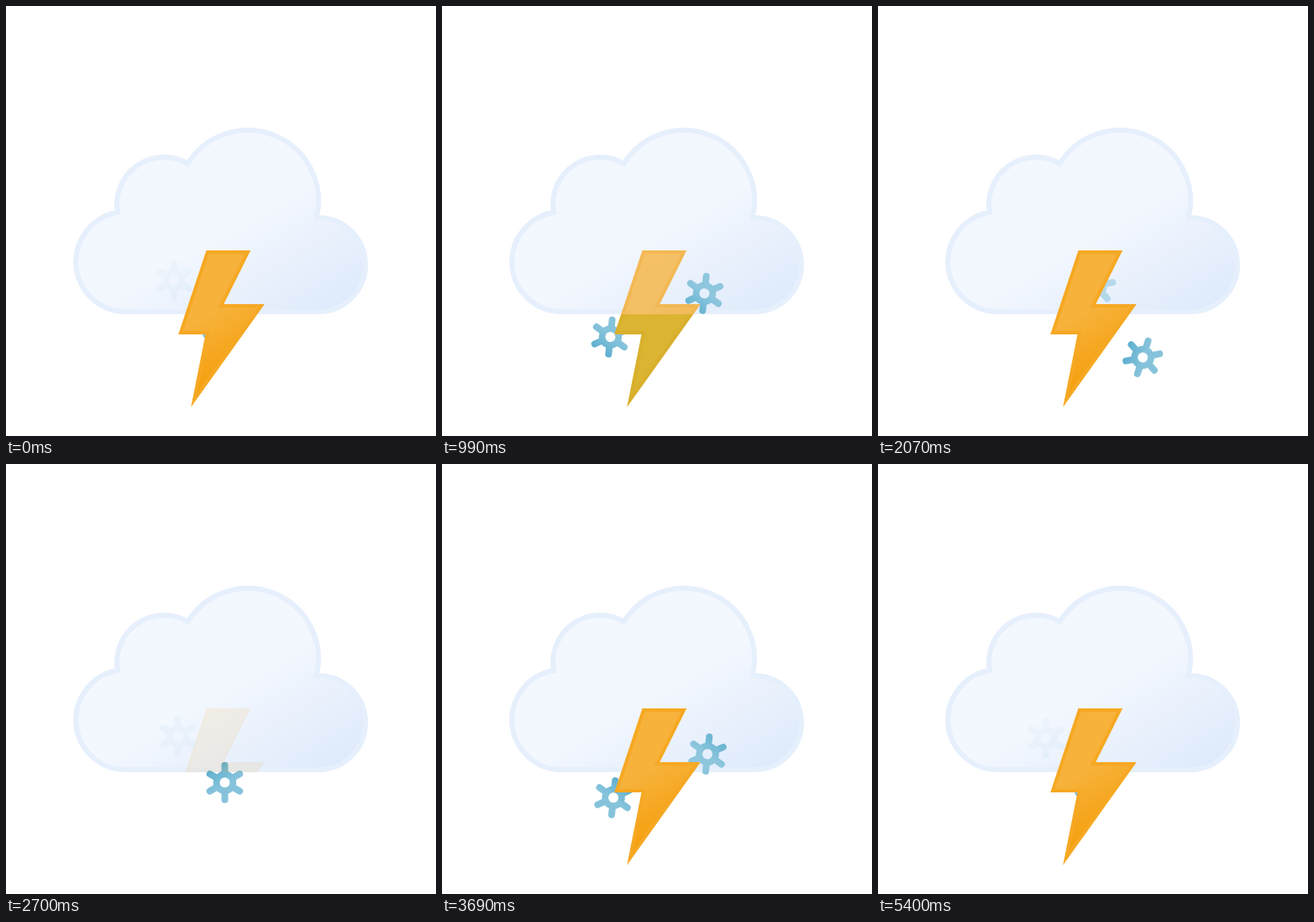
Recreate the animation shown at these times as an HTML page. Size 512 by 512 pixels, loop 5.43 s.

```html
<!DOCTYPE html>
<html lang="en">
<head>
<meta charset="utf-8">
<title>Thunderstorm with snow</title>
<style>
  html, body { margin: 0; height: 100%; overflow: hidden; background: #fff; }
  svg { display: block; width: 100%; height: 100%; }
</style>
</head>
<body>
<svg viewBox="0 0 512 512">
  <defs>
    <linearGradient id="cloudFill" gradientUnits="userSpaceOnUse" x1="180.5" y1="175.7" x2="313.6" y2="406.4">
      <stop offset=".45" stop-color="#f3f7fe"/><stop offset="1" stop-color="#deeafb"/>
    </linearGradient>
    <linearGradient id="boltFill" gradientUnits="userSpaceOnUse" x1="8.7" y1="17.1" x2="80.9" y2="142.1">
      <stop offset=".45" stop-color="#f7b23b"/><stop offset="1" stop-color="#f59e0b"/>
    </linearGradient>
    <linearGradient id="snowFill" gradientUnits="userSpaceOnUse" x1="-10.3" y1="-18.6" x2="11.1" y2="18.6">
      <stop offset=".45" stop-color="#86c3db"/><stop offset="1" stop-color="#5eafcf"/>
    </linearGradient>
    <clipPath id="upperClip"><path d="M0 0H512V367H0z"/></clipPath>
    <clipPath id="lowerClip"><path d="M0 367H512V512H0z"/></clipPath>
    <path id="bolt" stroke-width="4" stroke-miterlimit="10" d="M34.8 2l-32 96h32l-16 80 80-112h-48l32-64z"/>
    <g id="flake" fill="none" stroke="url(#snowFill)">
      <circle r="9.85" stroke-width="7.7"/>
      <path id="arms" stroke-width="8" stroke-linecap="round"/>
    </g>
  </defs>
  <path fill="url(#cloudFill)" stroke="#e6effc" stroke-width="6" stroke-miterlimit="10"
    d="M372 252q-1.2 0-2.4.1A84 84 0 0 0 216.6 187.8A56 56 0 0 0 133 245.8A59.5 59.5 0 0 0 143.5 364H372A56 56 0 0 0 372 252z"/>
  <g id="upper" clip-path="url(#upperClip)"></g>
  <g id="lower" clip-path="url(#lowerClip)"></g>
</svg>
<script>
const byId = id => document.getElementById(id);
const snow = [[202.3, -.02], [258.3, 2.12], [314.3, .79]]; // x, start in seconds
const flash = [[0, 1], [30, 1], [40, 0], [50, 1], [59, 0], [68, 1], [75, 0], [80, 1], [120, 1]];

byId('arms').setAttribute('d', [0, 1, 2, 3, 4, 5].map(i => {
  const a = (i * 60 - 90) * Math.PI / 180, c = Math.cos(a), s = Math.sin(a);
  return `M${10.5 * c} ${10.5 * s}L${20.5 * c} ${20.5 * s}`;
}).join(''));

function addUse(layer, id) {
  const el = document.createElementNS('http://www.w3.org/2000/svg', 'use');
  el.setAttribute('href', '#' + id);
  return layer.appendChild(el);
}

const layers = ['upper', 'lower'].map(id => {
  const g = byId(id);
  const flakes = snow.map(() => addUse(g, 'flake'));
  const bolt = addUse(g, 'bolt');
  bolt.setAttribute('transform', 'translate(205.2 291)');
  return { hard: id === 'lower', flakes, bolt };
});

function lerpKeys(keys, t) {
  const i = keys.findIndex(k => k[0] > t);
  const [t0, v0] = keys[i - 1], [t1, v1] = keys[i];
  return v0 + (v1 - v0) * (t - t0) / (t1 - t0);
}

function draw(now) {
  const step = Math.floor(now % 5430 / 30), t = step / 30;
  const glow = lerpKeys(flash, step * 2 % 120);
  for (const { hard, flakes, bolt } of layers) {
    // Below the cloud, transparency is all or nothing
    const alpha = a => hard ? +(a >= .5) : a;
    flakes.forEach((el, i) => {
      const [x, start] = snow[i], local = (t - start + 3) % 3;
      const fade = Math.max(0, Math.min(1, local / .34, (2 - local) / .34));
      el.setAttribute('transform', `translate(${x} ${324 + 64 * local}) rotate(${60 * t}) translate(-2.2 1)`);
      el.setAttribute('opacity', alpha(fade));
    });
    const dim = hard && glow < .95;
    bolt.setAttribute('opacity', alpha(glow));
    bolt.setAttribute('fill', dim ? '#dbb432' : 'url(#boltFill)');
    bolt.setAttribute('stroke', dim ? '#d9b02c' : '#f6a823');
  }
}

const begin = performance.now();
function tick() {
  draw(performance.now() - begin);
  requestAnimationFrame(tick);
}
tick();
</script>
</body>
</html>
```
